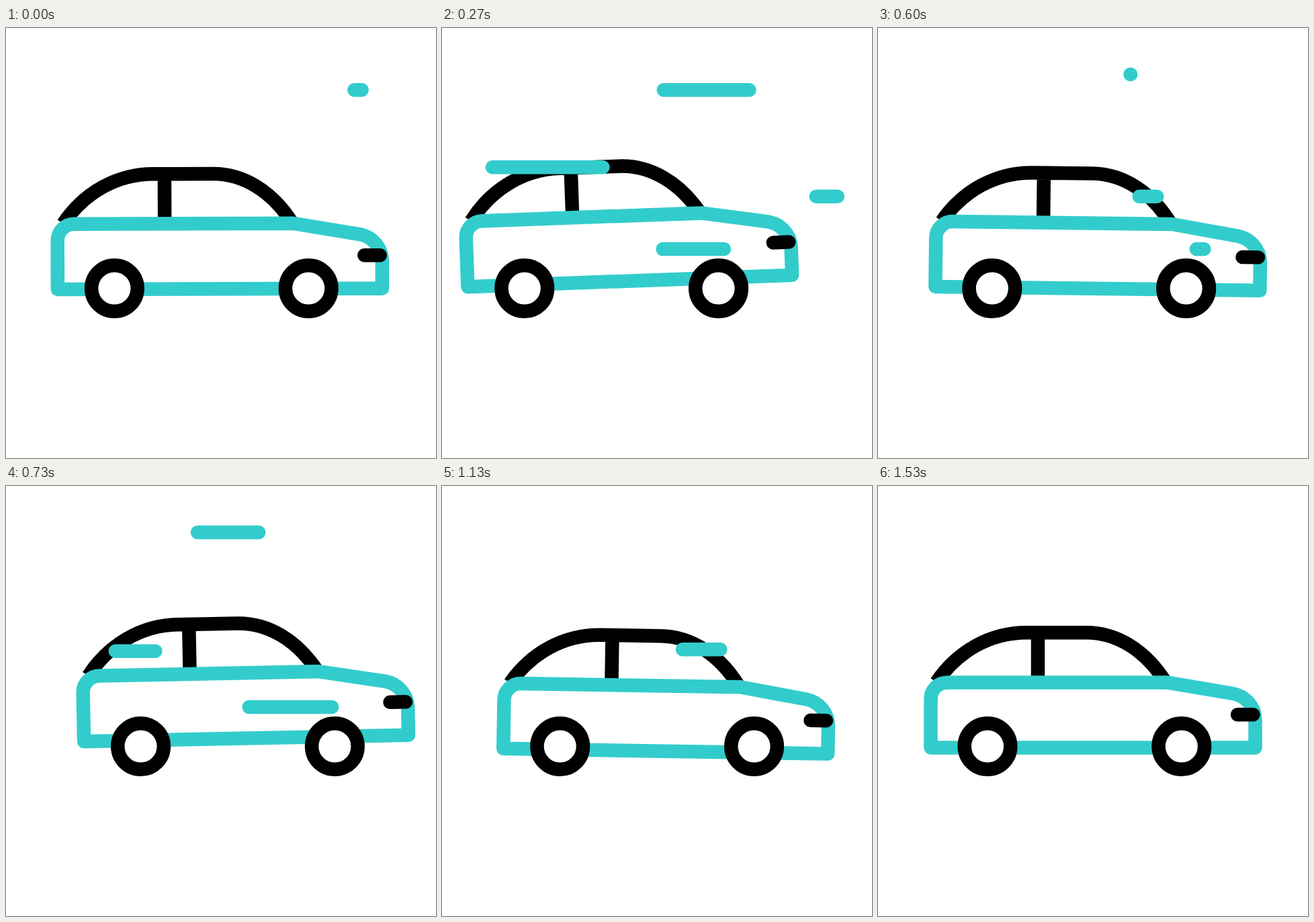
Animation of 640 by 640 pixels, one loop 1.67 s. Source, as an HTML page:

```html
<!DOCTYPE html>
<html lang="en">
<head>
<meta charset="utf-8">
<title>Driving car</title>
<style>
  html, body { margin: 0; width: 100%; height: 100%; overflow: hidden; background: #fff; }
  svg { display: block; width: 100%; height: 100%; fill: none; stroke-width: 20.5; }
  .dark { stroke: #000; }
  .teal { stroke: #3cc; stroke-linejoin: round; }
  .round { stroke-linecap: round; }
  circle { fill: #fff; }
</style>
</head>
<body>
<svg viewBox="0 0 640 640">
  <g id="body">
    <path class="dark" d="M87 292C118 246 167 218.3 221 218.3H310C355 218.3 398 244 428 292M238 218.3V290"/>
    <path class="teal" d="M78.5 389.6V317A24.6 24.6 0 0 1 103.1 292.4H430L528.5 309C547 312.5 561.5 329 561.5 348V389.6Z"/>
    <path class="dark round" d="M535 340.2H558.5"/>
  </g>
  <g id="wheels" class="dark">
    <circle cx="163" cy="387.5" r="34.3"/>
    <circle cx="451.8" cy="387.5" r="34.3"/>
  </g>
  <g id="wind" class="teal round"></g>
</svg>
<script>
// Times below are in steps of 1/30 s
const LOOP = 1670, FPS = 30, START = -1.33, END = 46;
const GROW = 9.2, SHRINK = 8.2, LAG = 6, LENGTH = 200;

const get = id => document.getElementById(id);
const body = get('body'), wheels = get('wheels'), wind = get('wind');

const ease = s => {
  s = Math.min(1, Math.max(0, s));
  return s * s * (3 - 2 * s);
};

// Eased track through [time, value] keys, from rest
function track(keys) {
  return n => {
    let t0 = START, v0 = 0, v = 0;
    for (const [t1, v1] of keys) {
      v += (v1 - v0) * ease((n - t0) / (t1 - t0));
      [t0, v0] = [t1, v1];
    }
    return v;
  };
}

// Two fading swings between low and high, then back to rest
function rock(first, half, low, high, fade) {
  const keys = [low, high, low, high].map((v, k) => [first + k * half, v * fade ** k]);
  return track([...keys, [END, 0]]);
}

const sway = track([[10.5, -45.5], [23.7, 41.5], [40, 0]]);
const lift = rock(6.15, 8.4, -15.8, 6.1, 0.97);
const tilt = rock(6.9, 9, -2.2, 1.2, 0.92);

// A streak grows leftwards from (x, y), then its tail catches up
function streak(start, x, y) {
  const path = document.createElementNS('http://www.w3.org/2000/svg', 'path');
  wind.append(path);
  return n => {
    const head = LENGTH * ease((n - start) / GROW);
    const tail = LENGTH * ease((n - start - LAG) / SHRINK);
    path.setAttribute('d', head - tail > 0.1 ? `M${x - tail} ${y}H${x - head}` : '');
  };
}

const gust = (first, gap, ...points) =>
  points.map(([x, y], i) => streak(START + first + Math.floor(i * gap), x, y));

const streaks = [
  ...gust(0, 2.5, [529.7, 92.2], [253.5, 207.2], [419.8, 329], [588.8, 250.8]),
  ...gust(18, 1, [485.2, 329], [376.2, 69], [222.5, 245.7]),
  ...gust(24, 0, [558, 243.2])
];

function draw(n) {
  const x = sway(n);
  body.setAttribute('transform', `translate(${x} ${lift(n)}) rotate(${tilt(n)} 320 390)`);
  wheels.setAttribute('transform', `translate(${x} 0)`);
  streaks.forEach(update => update(n));
}

const begin = performance.now();

function tick() {
  const t = (performance.now() - begin) % LOOP;
  draw(Math.min(END, Math.floor((t + 3.4) * FPS / 1000)));
  requestAnimationFrame(tick);
}
tick();
</script>
</body>
</html>
```
